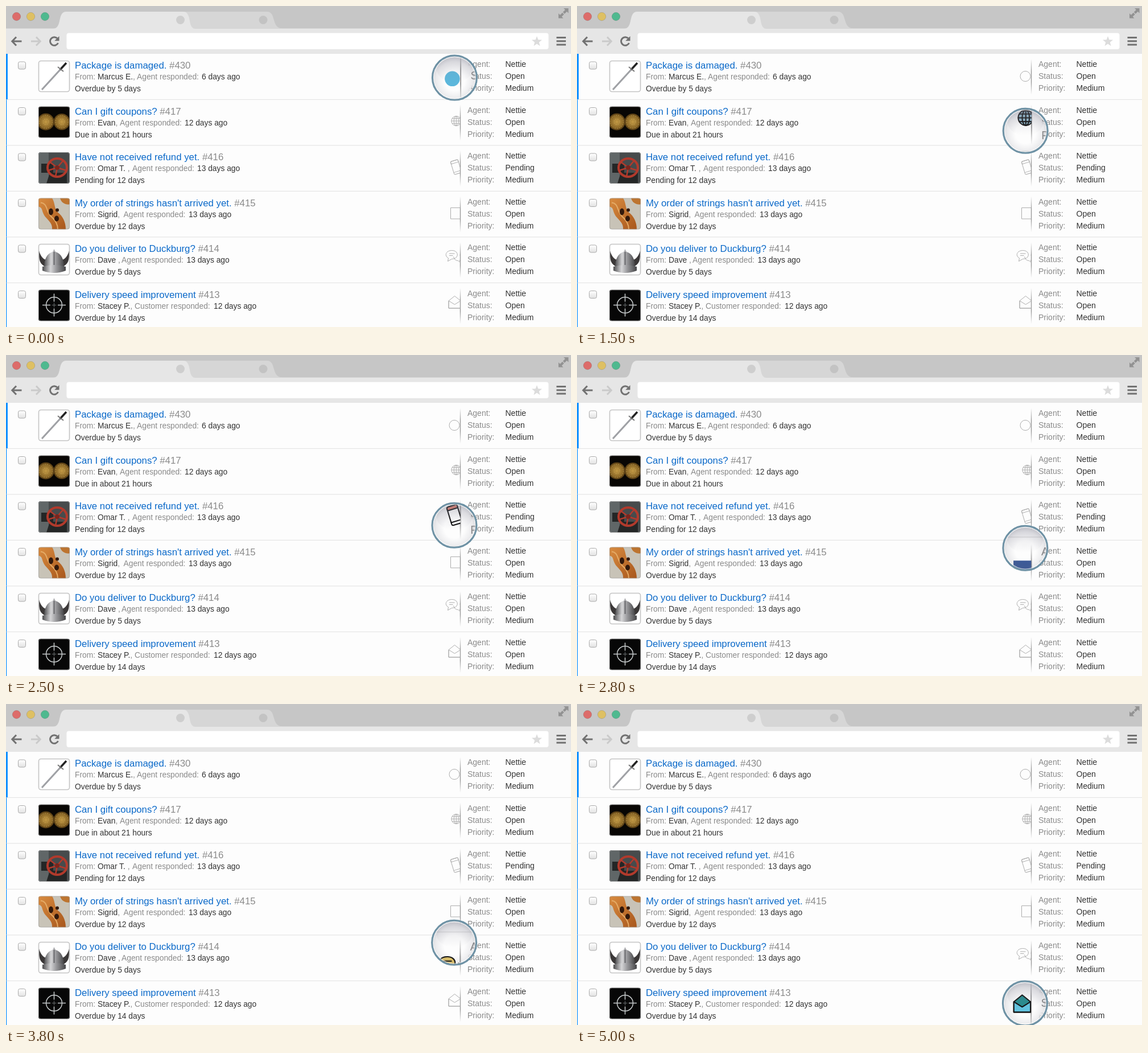
These frames come from a looping animation (993x564 px, 5500 ms). An HTML page:

```html
<!DOCTYPE html>
<html lang="en">
<head>
<meta charset="utf-8">
<title>Ticket list</title>
<style>
html, body { margin: 0; width: 100%; height: 100%; overflow: hidden; background: #fdfdfd; }
svg { display: block; width: 993px; height: 564px; }
text { font: 13.8px "Liberation Sans", Arial, sans-serif; fill: #333; white-space: pre; }
.subject { font-size: 16.8px; fill: #0a69c9; }
.meta text { font-size: 14px; }
.soft, .meta .soft { fill: #8a8a8a; }
.line { fill: none; stroke: #adadad; stroke-width: 1; stroke-linejoin: round; }
.ink { stroke: #111; stroke-width: 1.5; stroke-linejoin: round; stroke-linecap: round; }
</style>
</head>
<body>
<svg viewBox="0 0 993 564">
  <defs>
    <linearGradient id="fade" x2="0" y2="1">
      <stop offset="0" stop-color="#999" stop-opacity="0"/>
      <stop offset=".35" stop-color="#999"/>
      <stop offset=".65" stop-color="#999"/>
      <stop offset="1" stop-color="#999" stop-opacity="0"/>
    </linearGradient>
    <linearGradient id="box" x2="0" y2="1">
      <stop offset="0" stop-color="#fff"/><stop offset="1" stop-color="#e2e2e2"/>
    </linearGradient>
    <linearGradient id="steel">
      <stop offset="0" stop-color="#4d4d4f"/><stop offset=".35" stop-color="#d5d5d7"/>
      <stop offset=".6" stop-color="#98989b"/><stop offset="1" stop-color="#454547"/>
    </linearGradient>
    <radialGradient id="gold">
      <stop offset="0" stop-color="#c39a45"/><stop offset=".7" stop-color="#8e6a28"/>
      <stop offset="1" stop-color="#503711"/>
    </radialGradient>
    <linearGradient id="wood" x2="1" y2="1">
      <stop offset="0" stop-color="#d98c40"/><stop offset="1" stop-color="#a8571c"/>
    </linearGradient>
    <radialGradient id="pane">
      <stop offset=".8" stop-color="#fdfdfd"/>
      <stop offset="1" stop-color="#fdfdfd" stop-opacity=".45"/>
    </radialGradient>
    <radialGradient id="shade" cy=".56">
      <stop offset=".45" stop-color="#667" stop-opacity="0"/>
      <stop offset=".85" stop-color="#667" stop-opacity=".13"/>
      <stop offset="1" stop-color="#667" stop-opacity=".25"/>
    </radialGradient>
    <linearGradient id="shine" x2="0" y2="1">
      <stop offset="0" stop-color="#889" stop-opacity=".22"/>
      <stop offset="1" stop-color="#889" stop-opacity="0"/>
    </linearGradient>
    <clipPath id="thumb"><rect width="55" height="55" rx="4"/></clipPath>
    <clipPath id="left"><rect y="84" width="798.5" height="480"/></clipPath>
    <clipPath id="round"><circle r="39"/></clipPath>
  </defs>

  <rect width="993" height="564" fill="#fdfdfd"/>
  <g id="list"></g>

  <rect width="993" height="84" fill="#e6e6e6"/>
  <rect width="993" height="39.5" fill="#c6c6c6"/>
  <path d="M310 39.5V10H459C475 10 466 39.5 486 39.5Z" fill="#d6d6d6"/>
  <path d="M82 40C100 40 89 10 106 10H311C328 10 318 40 333 40Z" fill="#e6e6e6"/>
  <circle cx="306.500" cy="24.500" r="7.500" fill="#cecece"/>
  <circle cx="452" cy="24.500" r="7.500" fill="#c3c3c3"/>
  <g stroke-opacity=".12" stroke="#000">
    <circle cx="18.500" cy="18.500" r="7.200" fill="#dd6c6a"/>
    <circle cx="43.500" cy="18.500" r="7.200" fill="#dec063"/>
    <circle cx="68.500" cy="18.500" r="7.200" fill="#4fb98f"/>
  </g>
  <g fill="#929292">
    <path d="M980 4H988.500V12.500L985.700 9.700L981.700 13.700L978.800 10.800L982.800 6.800Z"/>
    <path d="M979.500 21.500H971V13L973.800 15.800L977.800 11.800L980.700 14.700L976.700 18.700Z"/>
  </g>
  <g fill="none" stroke="#717171" stroke-width="3">
    <path d="M18 54.500L10.800 62L18 69.500M11 62H27.500"/>
    <path d="M53 54.500L60.200 62L53 69.500M60 62H44" stroke="#cacaca"/>
    <path d="M90 56.800A7.300 7.300 0 1 0 91.500 65"/>
    <path d="M967.500 55.500H984M967.500 61.800H984M967.500 68H984"/>
  </g>
  <path d="M93.500 53V61.300H85.200Z" fill="#717171"/>
  <rect x="106.500" y="47.500" width="847" height="28.500" rx="4" fill="#fff"/>
  <path id="star" fill="#dcdcdc"/>

  <g id="lens">
    <circle r="39" fill="url(#pane)"/>
    <g clip-path="url(#round)"><g id="zoom"></g></g>
    <circle r="39" fill="url(#shade)"/>
    <ellipse cy="-14" rx="31" ry="22" fill="url(#shine)"/>
    <circle r="36.800" fill="none" stroke="#fff" stroke-opacity=".65" stroke-width="1.500"/>
    <circle r="39" fill="none" stroke="#5d8499" stroke-width="3"/>
    <circle r="39" fill="none" stroke="#8fadbc" stroke-width=".8"/>
  </g>
</svg>
<script>
const $ = id => document.getElementById(id);
const PITCH = 80.5, ZOOM = 1.4, LOOP = 5500;

// subject, number, sender, responder, responder x, date, date x, due, status
const tickets = [
  ['Package is damaged.', 430, 'Marcus E.', 'Agent', 230, '6 days ago', 344, 'Overdue by 5 days', 'Open'],
  ['Can I gift coupons?', 417, 'Evan', 'Agent', 200, '12 days ago', 314, 'Due in about 21 hours', 'Open'],
  ['Have not received refund yet.', 416, 'Omar T. ', 'Agent', 222, '13 days ago', 336, 'Pending for 12 days', 'Pending'],
  ["My order of strings hasn't arrived yet.", 415, 'Sigrid', 'Agent', 206.5, '13 days ago', 321, 'Overdue by 12 days', 'Open'],
  ['Do you deliver to Duckburg?', 414, 'Dave ', 'Agent', 203, '13 days ago', 317.5, 'Overdue by 5 days', 'Open'],
  ['Delivery speed improvement', 413, 'Stacey P.', 'Customer', 226, '12 days ago', 365, 'Overdue by 14 days', 'Open']
];

const thumbs = [
  `<rect width="55" height="55" fill="#fff"/>
   <path d="M6 51L39 15" stroke="#85878c" stroke-width="2.600"/><path d="M6 51L39 15" stroke="#d4d5d9" stroke-width=".8"/>
   <path d="M38 16L49 4" stroke="#222" stroke-width="3.500"/>
   <path d="M34 11L44 19" stroke="#777" stroke-width="2"/>`,
  `<rect width="55" height="55" fill="#080604"/>
   <circle cx="13" cy="27" r="15" fill="url(#gold)"/><circle cx="41" cy="27" r="14.500" fill="url(#gold)"/>
   <g fill="none" stroke="#d8b566" stroke-opacity=".6" stroke-dasharray="2 2">
   <circle cx="13" cy="27" r="11.500"/><circle cx="41" cy="27" r="11"/><circle cx="13" cy="27" r="5"/><circle cx="41" cy="27" r="5"/></g>`,
  `<rect width="55" height="55" fill="#474b4c"/><path d="M0 0H18V55H0Z" fill="#606667"/>
   <path d="M5 20H26V36H5ZM20 36H50V55H14Z" fill="#242626"/>
   <g fill="none" stroke="#b13a2c"><ellipse cx="33" cy="27" rx="17" ry="16" stroke-width="4"/>
   <path d="M33 27L20 17M33 27L44 14M33 27L49 32M33 27L30 43M33 27L17 32" stroke-width="2.500"/></g>
   <circle cx="33" cy="27" r="4" fill="#7c251c"/>`,
  `<rect width="55" height="55" fill="#c8c3b7"/>
   <path d="M0 0H24C30 10 27 17 34 25C43 32 48 42 48 55H24C25 43 16 39 10 30C5 21 8 17 0 15Z" fill="url(#wood)"/>
   <path d="M38 0H55V11C47 12 40 8 38 0Z" fill="#bd742f"/>
   <path d="M4 8C16 9 13 23 23 33C31 40 34 47 34 55" fill="none" stroke="#e4ab66" stroke-width="2"/>
   <g fill="#33190c"><ellipse cx="22" cy="24" rx="4" ry="6"/><ellipse cx="32" cy="36" rx="4" ry="5"/><circle cx="33" cy="21" r="3"/></g>`,
  `<rect width="55" height="55" fill="#fff"/>
   <path d="M1 12C0 28 3 37 13 40L16 29C8 27 4 22 1 12ZM54 12C55 28 52 37 42 40L39 29C47 27 51 22 54 12Z" fill="#3b3838"/>
   <path d="M27.500 9L30 14C41 17 45 28 45 42H10C10 28 14 17 25 14Z" fill="url(#steel)"/>
   <path d="M7 40Q27.500 34 48 40V47Q27.500 55 7 47Z" fill="url(#steel)"/>
   <path d="M27.500 14V37" stroke="#66666a" stroke-width="2"/>`,
  `<rect width="55" height="55" fill="#070707"/>
   <g fill="none" stroke="#c8cccd" stroke-width="1.500"><circle cx="27.500" cy="27" r="14"/>
   <path d="M27.500 7V21M27.500 33V47M7 27H21M34 27H48"/></g>
   <path d="M27.500 23V31M23.500 27H31.500" stroke="#8c9192" stroke-width=".7"/>`
];

const globe = (y, r, cls, fill) => `<g class="${cls}" fill="${fill}" transform="translate(791.3 ${y})">
  <circle r="${r}"/><ellipse rx="${r * .48}" ry="${r}" fill="none"/>
  <path d="M0 ${-r}V${r}M${-r} 0H${r}M${-r * .85} ${-r * .5}H${r * .85}M${-r * .85} ${r * .5}H${r * .85}"/></g>`;

const phone = (y, cls, body, cap) => `<g class="${cls}" transform="translate(791 ${y}) rotate(-17)">
  <rect x="-6.700" y="-12" width="13.400" height="24" rx="2" fill="${body}"/>
  <path d="M-6.700 -7.500V-10Q-6.700 -12 -4.700 -12H4.700Q6.700 -12 6.700 -10V-7.500ZM-6.700 8H6.700" fill="${cap}"/></g>`;

const bubbles = (x, y, cls, main, other) => `<g class="${cls}" transform="translate(${x} ${y})">
  <path d="M13 11Q15 18 21 18L25 21L24 17Q29 13 24 8" fill="${other}"/>
  <path d="M10 0C23 0 23 15 10 15L3 19L4 13.500C-4 9 0 0 10 0Z" fill="${main}"/>
  <path d="M5.500 5.500H15M5.500 9H12" fill="none"/></g>`;

const mail = (x, y, cls, flap, body) => `<g class="${cls}" transform="translate(${x} ${y})">
  <path d="M0 8.500L10.500 0L21 8.500V21.500H0Z" fill="${flap}"/>
  <path d="M0 8.500L10.500 15L21 8.500V21.500H0Z" fill="${body}"/></g>`;

const paleIcons = `
  <circle class="line" cx="788" cy="123.500" r="9"/>
  ${globe(202, 8.5, 'line', 'none')}${phone(283, 'line', 'none', 'none')}
  <rect class="line" x="781.500" y="354.500" width="19.500" height="19.500"/>
  ${bubbles(773.5, 429.5, 'line', 'none', 'none')}${mail(778, 509.5, 'line', 'none', 'none')}`;

const brightIcons = `
  <circle cx="788" cy="127.300" r="9.500" fill="#5cb7dc"/>
  ${globe(203, 9.5, 'ink', '#8fb7ca')}${phone(286.3, 'ink', '#fff', '#e87f6d')}
  <rect x="776" y="355" width="22.500" height="22" fill="#3c5a98"/>
  ${bubbles(772.3, 437, 'ink', '#dfc267', '#fff')}${mail(776.8, 515.5, 'ink', '#278b8e', '#62c2de')}`;

const label = (x, y, s, cls = '') => `<text x="${x}" y="${y}" class="${cls}">${s}</text>`;

function side(icons) {
  const rows = tickets.map((t, i) => `<g class="meta" transform="translate(0 ${i * PITCH})">
    <rect y="163.800" width="993" height="1.200" fill="#e5e5e5"/>
    <rect x="797.800" y="93" width="1.400" height="63" fill="url(#fade)"/>
    ${label(811, 107, 'Agent:', 'soft')}${label(811, 128, 'Status:', 'soft')}${label(811, 149, 'Priority:', 'soft')}
    ${label(877.5, 107, 'Nettie')}${label(877.5, 128, t[8])}${label(877.5, 149, 'Medium')}</g>`);
  return `${rows.join('')}<g clip-path="url(#left)">${icons}</g>`;
}

function ticket([subject, id, name, who, whoX, date, dateX, due], i) {
  const framed = i % 4 === 0;
  return `<g transform="translate(0 ${i * PITCH})">
    <rect y="84" width="${i ? 1.2 : 3}" height="80" fill="#1190ff"/>
    <rect x="21.500" y="98" width="13" height="13" rx="3" fill="url(#box)" stroke="#aaa"/>
    <g transform="translate(57 96)"><g clip-path="url(#thumb)">${thumbs[i]}</g>
    <rect x=".5" y=".5" width="54" height="54" rx="4" fill="none" stroke="${framed ? '#c4c4c4' : '#999'}"
      stroke-width="${framed ? 1.6 : .6}"/></g>
    <text class="subject" x="121" y="110">${subject}<tspan class="soft"> #${id}</tspan></text>
    <text x="121" y="129"><tspan class="soft">From:</tspan><tspan x="161">${name}</tspan><tspan class="soft">,</tspan><tspan
      class="soft" x="${whoX}">${who} responded:</tspan><tspan x="${dateX}">${date}</tspan></text>
    ${label(121, 150, due)}</g>`;
}

$('list').innerHTML = side(paleIcons) + tickets.map(ticket).join('');
$('zoom').innerHTML = side(brightIcons);
$('star').setAttribute('d', 'M' + Array.from({ length: 10 }, (_, i) => {
  const a = i * Math.PI / 5, r = i % 2 ? 4 : 9.5;
  return `${933 + r * Math.sin(a)} ${62.5 - r * Math.cos(a)}`;
}).join('L') + 'Z');

// Six hard steps carry the lens down each row.
function rowAt(t) {
  let steps = 0;
  for (let start = 500; start < LOOP - 500; start += 1000)
    steps += Math.min(6, Math.max(0, Math.floor((t - start) / 100) + 1));
  return steps / 6;
}

function draw(now) {
  const row = rowAt(now % LOOP), x = 788.4 - row * .2, y = 126 + row * 80;
  $('lens').setAttribute('transform', `translate(${x} ${y})`);
  $('zoom').setAttribute('transform', `translate(-4 0) scale(${ZOOM}) translate(-788 ${-y})`);
  requestAnimationFrame(() => draw(performance.now() - begin));
}

const begin = performance.now();
draw(0);
</script>
</body>
</html>
```
